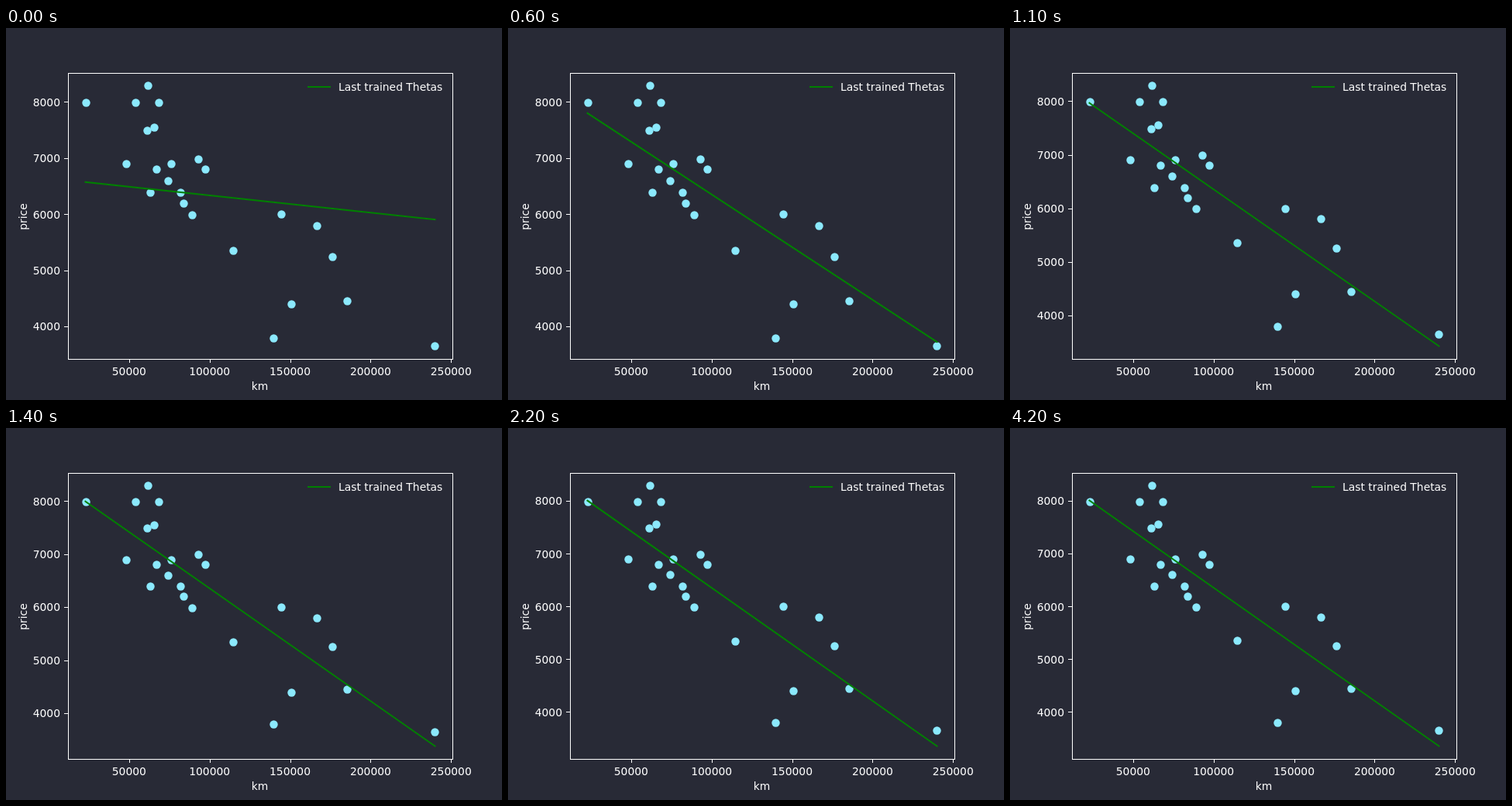
An HTML page with a canvas for the animation above (4.3 s loop, 640x480 px).

```html
<!DOCTYPE html>
<html lang="en">
<head>
<meta charset="utf-8">
<title>Linear regression training</title>
<style>
  html, body { margin: 0; width: 100%; height: 100%; overflow: hidden; background: #282a36; }
  canvas { display: block; }
</style>
</head>
<body>
<canvas id="stage" width="640" height="480"></canvas>
<script>
const ctx = document.getElementById("stage").getContext("2d");
const LOOP = 4300, STEP = 100;
const FIRST_ERROR = 0.857, DECAY = 0.725;
const BOX = { left: 80, right: 576, top: 57.6, bottom: 427.2 };
const FONT = '13.889px "DejaVu Sans", sans-serif';

// [km, price]
const cars = [
  [240000, 3650], [139800, 3800], [150500, 4400], [185530, 4450],
  [176000, 5250], [114800, 5350], [166800, 5800], [89000, 5990],
  [144500, 5999], [84000, 6200], [82029, 6390], [63060, 6390],
  [74000, 6600], [97500, 6800], [67000, 6800], [76025, 6900],
  [48235, 6900], [93000, 6990], [60949, 7490], [65674, 7555],
  [54000, 7990], [68500, 7990], [22899, 7990], [61789, 8290]
];
const kms = cars.map(c => c[0]), prices = cars.map(c => c[1]);
const mean = list => list.reduce((a, b) => a + b, 0) / list.length;
const kmMean = mean(kms), priceMean = mean(prices);
const bestSlope = mean(cars.map(([k, p]) => (k - kmMean) * (p - priceMean)))
                / mean(kms.map(k => (k - kmMean) ** 2));
const kmMin = Math.min(...kms), kmMax = Math.max(...kms);

// Linear scale with a 5% margin on both ends
function scale(min, max, from, to) {
  const margin = (max - min) * 0.05;
  return v => from + (to - from) * (v - min + margin) / (max - min + 2 * margin);
}
const snap = v => Math.floor(v + 0.5) + 0.5;
const xOf = scale(kmMin, kmMax, BOX.left, BOX.right);

function stroke(color, width, points, cap = "butt") {
  ctx.strokeStyle = color;
  ctx.lineWidth = width;
  ctx.lineCap = cap;
  ctx.beginPath();
  points.forEach(([x, y]) => ctx.lineTo(x, y));
  ctx.stroke();
}

function text(string, x, y, align) {
  ctx.fillStyle = "#fff";
  ctx.textAlign = align;
  ctx.fillText(string, x, y);
}

function drawAxes(yOf) {
  for (let km = 50000; km <= 250000; km += 50000) {
    const x = snap(xOf(km));
    stroke("#fff", 1, [[x, 428], [x, 432]]);
    text(String(km), xOf(km), 448, "center");
  }
  for (let price = 4000; price <= 8000; price += 1000) {
    const y = snap(yOf(price));
    stroke("#fff", 1, [[75, y], [80, y]]);
    text(String(price), 70, Math.round(yOf(price) + 5.3), "right");
  }
  ctx.strokeRect(80.5, 58.5, 496, 369);
  text("km", 327.5, 467, "center");
  ctx.save();
  ctx.translate(27, 243.5);
  ctx.rotate(-Math.PI / 2);
  text("price", 0, 0, "center");
  ctx.restore();
}

function draw(time) {
  const step = Math.floor((time % LOOP) / STEP);
  const slope = bestSlope * (1 - FIRST_ERROR * DECAY ** step);
  const predict = km => priceMean + slope * (km - kmMean);
  const yOf = scale(Math.min(...prices, predict(kmMax)), Math.max(...prices),
                    BOX.bottom, BOX.top);

  ctx.fillStyle = "#282a36";
  ctx.fillRect(0, 0, 640, 480);
  ctx.font = FONT;

  ctx.fillStyle = "#8be9fd";
  for (const [km, price] of cars) {
    ctx.beginPath();
    ctx.arc(snap(xOf(km)), snap(yOf(price)), 5.2, 0, Math.PI * 2);
    ctx.fill();
  }
  stroke("#008000", 2.08, [kmMin, kmMax].map(km => [xOf(km), yOf(predict(km))]), "square");
  drawAxes(yOf);

  stroke("#008000", 2, [[390, 76], [418, 76]], "square");
  text("Last trained Thetas", 429, 81, "left");
}

const start = performance.now();
function tick() {
  draw(performance.now() - start);
  requestAnimationFrame(tick);
}
tick();
</script>
</body>
</html>
```
